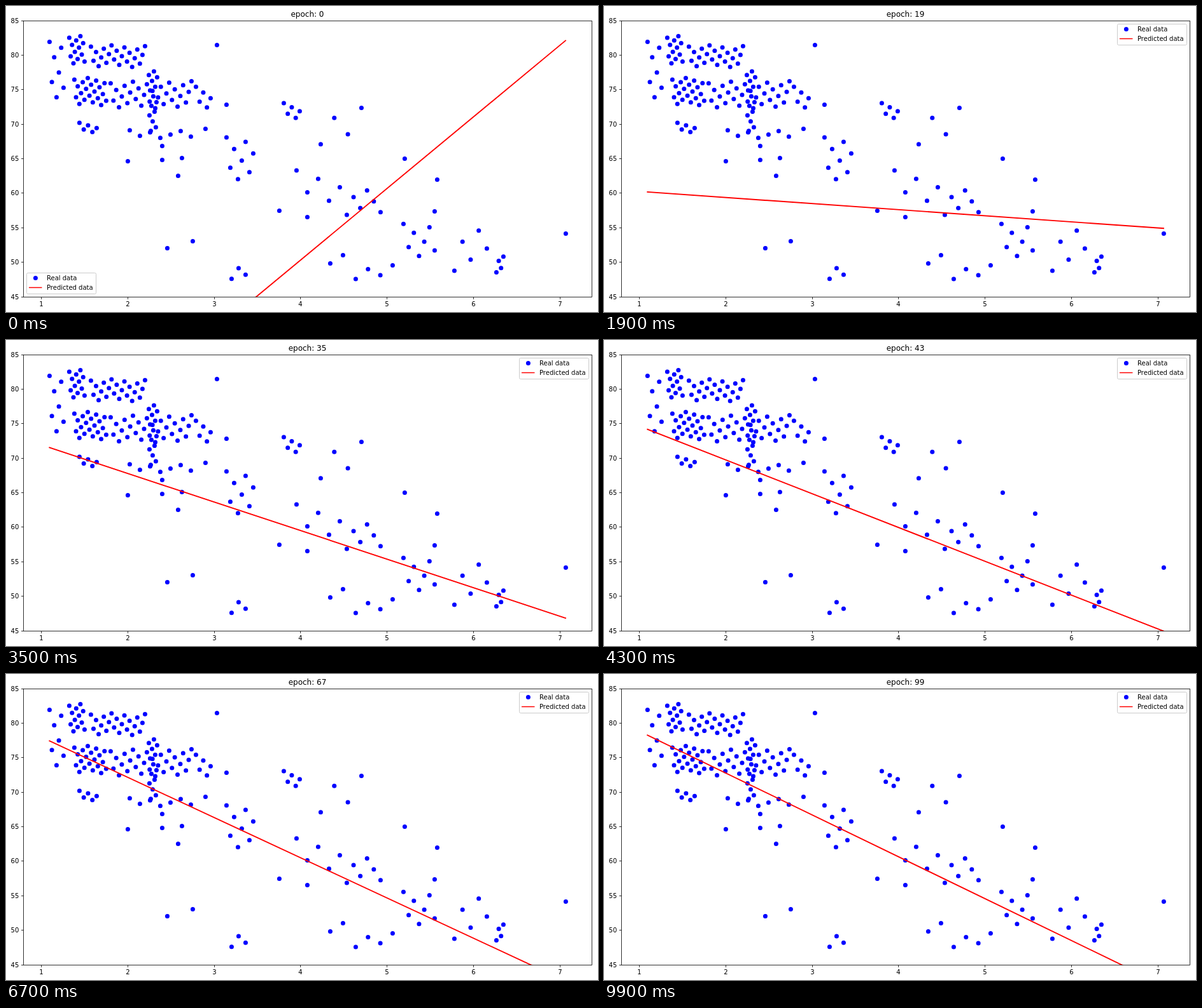
These frames come from a looping animation (930 px wide and 482 px high, 10 s). An HTML page:

```html
<!DOCTYPE html>
<html lang="en">
<head>
<meta charset="utf-8">
<title>Linear regression</title>
<style>
  html, body { margin: 0; width: 100%; height: 100%; overflow: hidden; background: #fff; }
  svg { display: block; width: 930px; height: 482px; }
  text { font: 10px "DejaVu Sans", Verdana, sans-serif; fill: #000; }
  #title { font-size: 12px; }
  .mid { text-anchor: middle; }
  .end { text-anchor: end; }
  .axis { fill: none; stroke: #000; stroke-width: .8; }
  .dot { fill: #00f; }
  .fit { fill: none; stroke: #f00; stroke-width: 1.9; stroke-linecap: square; }
  #legend .fit { stroke-width: 1.5; }
  #legend rect { fill: #fff; fill-opacity: .8; stroke: #ccc; }
</style>
</head>
<body>
<svg viewBox="0 0 930 482">
  <clipPath id="plot"><rect x="27.5" y="23.5" width="893" height="435"/></clipPath>
  <g clip-path="url(#plot)">
    <g id="dots" transform="translate(.4 .4)"></g>
    <path id="line" class="fit"/>
  </g>
  <g id="axes"><rect class="axis" x="27.5" y="23.5" width="893" height="435"/></g>
  <text id="title" class="mid" x="473.5" y="17"></text>
  <g id="legend">
    <rect x=".5" y=".5" width="109" height="33" rx="2"/>
    <circle class="dot" cx="14.4" cy="8.4" r="3.5"/>
    <path class="fit" d="M4.7 23.5H23.7"/>
    <text x="32" y="12">Real data</text>
    <text x="32" y="27">Predicted data</text>
  </g>
</svg>
<script>
const $ = id => document.getElementById(id);

function add(parent, tag, attrs, text = '') {
  const el = document.createElementNS('http://www.w3.org/2000/svg', tag);
  for (const key in attrs) el.setAttribute(key, attrs[key]);
  el.textContent = text;
  parent.append(el);
}

const dot = (cx, cy) => add($('dots'), 'circle', { class: 'dot', cx, cy, r: 3.5 });

// Loose points: x, y pairs
const loose = [
  331,61, 313,193, 346,155, 429,322, 473,332, 509,405, 529,392, 626,240,
  677,273, 673,323, 879,358, 253,381, 293,370, 270,267, 191,244, 245,242,
  276,239, 245,220
];
for (let i = 0; i < loose.length; i += 2) dot(loose[i], loose[i + 1]);

// Clumps: left, right, top, bottom, count
const clumps = [
  [68, 90, 46, 148, 7], [99, 123, 45, 92, 12], [107, 157, 111, 156, 20],
  [115, 142, 182, 199, 5], [133, 218, 60, 96, 22], [164, 291, 117, 161, 30],
  [224, 237, 98, 201, 14], [194, 290, 194, 208, 7], [298, 321, 123, 161, 5],
  [346, 388, 199, 276, 8], [354, 376, 432, 405, 3], [436, 461, 150, 177, 5],
  [494, 558, 224, 157, 4], [456, 524, 253, 309, 5], [535, 588, 333, 288, 6],
  [549, 607, 432, 407, 4], [624, 673, 337, 396, 7], [704, 755, 424, 350, 5],
  [770, 781, 422, 393, 4]
];
for (const [left, right, top, bottom, count] of clumps) {
  for (let i = 0; i < count; i++) {
    const u = i / (count - 1);
    const v = (.1 + i * .618034) % 1;
    dot(left + u * (right - left), top + v * (bottom - top));
  }
}

const axes = $('axes');
for (let n = 1; n <= 7; n++) {
  const x = Math.floor(55.1 + (n - 1) * 135.95) + .5;
  add(axes, 'path', { class: 'axis', d: `M${x} 458.5v3.5` });
  add(axes, 'text', { class: 'mid', x, y: 473 }, n);
}
for (let n = 45; n <= 85; n += 5) {
  const y = Math.floor(458 - (n - 45) * 10.875) + .5;
  add(axes, 'path', { class: 'axis', d: `M27.5 ${y}h-3.5` });
  add(axes, 'text', { class: 'end', x: 20.3, y: y + 3.7 }, n);
}

// Gradient descent: one slow and one fast mode
function show(epoch) {
  const slow = Math.exp(-.06097 * epoch);
  const fast = (-.2) ** epoch;
  const left = 94.8 + 631 * slow + 2 * fast;
  const right = 491.2 - 449 * slow + 12.3 * fast;
  $('line').setAttribute('d', `M68.3 ${left}L879 ${right}`);
  $('title').textContent = 'epoch: ' + epoch;
  $('legend').setAttribute('transform', epoch ? 'translate(806 28)' : 'translate(32 420)');
}

const start = performance.now();
let shown = -1;
function tick() {
  const epoch = Math.floor((performance.now() - start) / 100) % 100;
  if (epoch !== shown) show(shown = epoch);
  requestAnimationFrame(tick);
}
tick();
</script>
</body>
</html>
```
